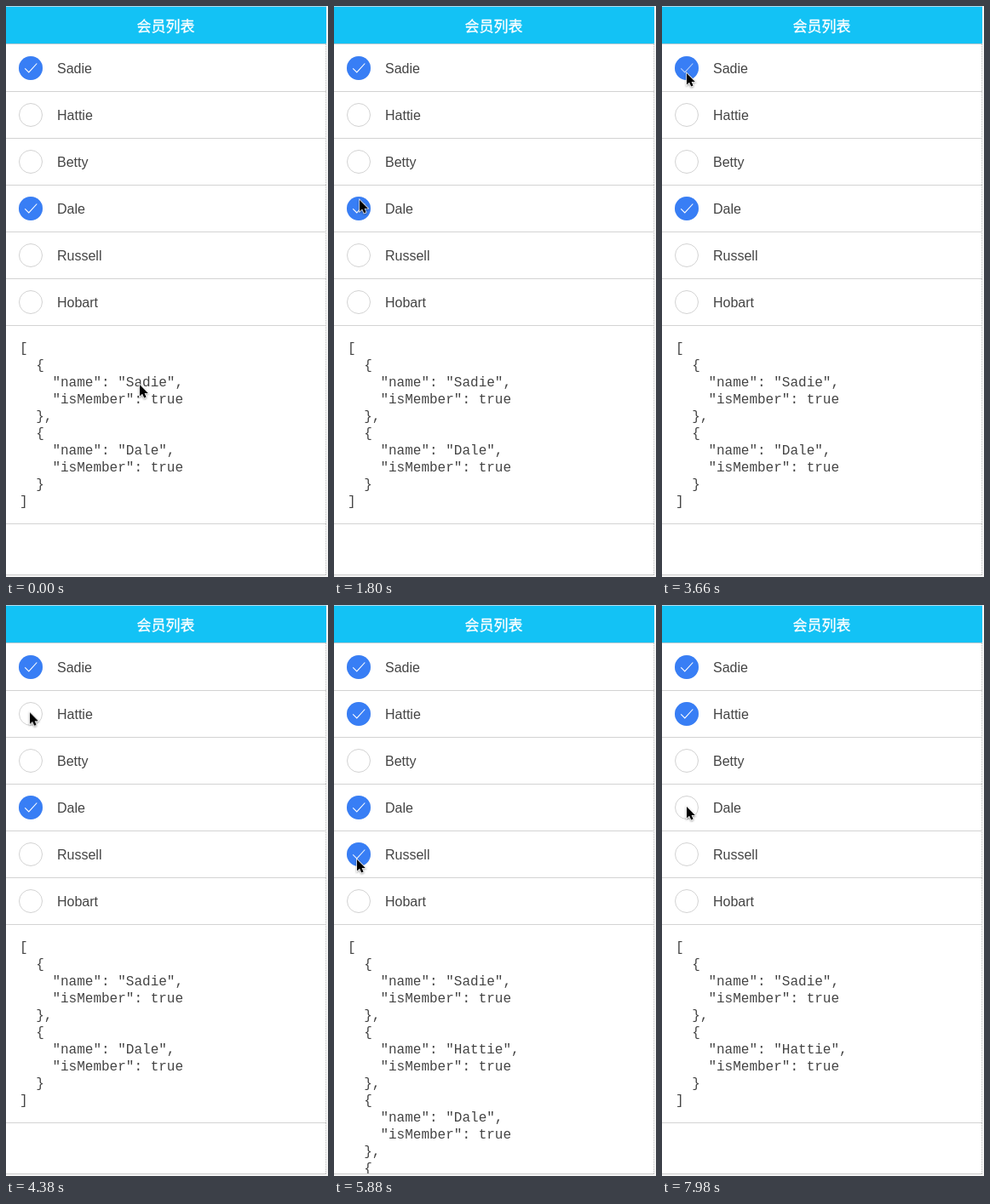
An HTML page for the animation above (8000 ms loop, 378x671 px).

```html
<!DOCTYPE html>
<html lang="zh">
<head>
<meta charset="utf-8">
<title>会员列表</title>
<style>
*, ::before, ::after { box-sizing: border-box; }
html, body { margin: 0; width: 100%; height: 100%; overflow: hidden; background: #f5f5f5; }
.stage { position: relative; width: 378px; height: 671px; overflow: hidden; background: #f5f5f5; }
.page {
  position: absolute; left: 0; top: 0; width: 376px; height: 669px; overflow: hidden;
  background: #fff; border-bottom: 1px solid #ccc;
  color: #444; font: 16px "Liberation Sans", Arial, sans-serif;
}
.page::after { content: ""; position: absolute; right: 0; top: 45px; bottom: 0; border-right: 1px dotted #bbb; }
header {
  height: 45px; padding-right: 1px; background: #13c2f5;
  border-top: 1px solid #b5dcea; border-bottom: 1px solid #b2c8d0;
  color: #fff; font: 500 17px/43px "Noto Sans CJK SC", "Noto Sans CJK", sans-serif; text-align: center;
  -webkit-text-stroke: .3px #fff;
}
.row { position: relative; height: 55px; padding-left: 60px; border-bottom: 1px solid #d3d3d3; line-height: 56px; }
.row:first-of-type { height: 56px; padding-top: 1px; }
.row::before, .dot { content: ""; position: absolute; left: 15px; bottom: 13px; width: 28px; height: 28px; border-radius: 50%; }
.row::before { border: 1px solid #d2d2d2; }
.dot { background: #387ef5; }
.dot svg { display: block; fill: none; stroke: #fff; stroke-width: 1.1; }
.json {
  padding: 17px 0 15px 16px; border-bottom: 1px solid #d3d3d3;
  font: 16px/20px "Liberation Mono", "Courier New", monospace; white-space: pre;
}
.item { height: 80px; overflow: hidden; }
.cursor { position: absolute; left: 0; top: 0; overflow: visible; filter: drop-shadow(0 1px 1px #0006); animation: move 8s ease-in-out infinite; }

/* each member's state drives both its check and its JSON block */
.a { animation: a 8s step-end infinite; }
.b { animation: b 8s step-end infinite; }
.c { animation: c 8s step-end infinite; }
.d { animation: d 8s step-end infinite; }
@keyframes a { 0%, 45%, 100% { opacity: 1; max-height: 80px; } 32.25% { opacity: 0; max-height: 0; } }
@keyframes b { 0% { opacity: 0; max-height: 0; } 57%, 100% { opacity: 1; max-height: 80px; } }
@keyframes c { 0% { opacity: 1; max-height: 80px; } 99%, 100% { opacity: 0; max-height: 0; } }
@keyframes d { 0%, 88.5%, 100% { opacity: 0; max-height: 0; } 72% { opacity: 1; max-height: 80px; } }

.a svg { animation: fade 8s -4.4s linear infinite; }
.b svg { animation: fade 8s -3.44s linear infinite; }
.d svg { animation: fade 8s -2.24s linear infinite; }
@keyframes fade { 0% { opacity: .35; } 1.8%, 100% { opacity: 1; } }

@keyframes move {
  0%, .75% { transform: translate(157px, 445px); }
  12.5%, 14.25% { transform: translate(30px, 64px); }
  20%, 21.75% { transform: translate(30px, 231px); }
  29.25%, 33% { transform: translate(33px, 76px); }
  42%, 47% { transform: translate(29px, 79px); }
  55.5%, 58% { transform: translate(28px, 127px); }
  62.25% { transform: translate(29px, 169px); }
  71%, 74.25% { transform: translate(27px, 299px); }
  79% { transform: translate(30px, 290px); }
  84%, 88.5% { transform: translate(28px, 297px); }
  96.75%, 100% { transform: translate(29px, 237px); }
}
</style>
</head>
<body>
<svg width="0" height="0" style="position:absolute">
  <symbol id="check" viewBox="0 0 28 28"><path d="M7.2 14.3 11.8 18.9 21.3 8.5"/></symbol>
</svg>
<div class="stage">
  <div class="page">
    <header>会员列表</header>
    <div class="row"><i class="dot a"><svg width="28" height="28"><use href="#check"/></svg></i>Sadie</div>
    <div class="row"><i class="dot b"><svg width="28" height="28"><use href="#check"/></svg></i>Hattie</div>
    <div class="row">Betty</div>
    <div class="row"><i class="dot c"><svg width="28" height="28"><use href="#check"/></svg></i>Dale</div>
    <div class="row"><i class="dot d"><svg width="28" height="28"><use href="#check"/></svg></i>Russell</div>
    <div class="row">Hobart</div>
    <div class="json"><div>[</div><div class="item a">  {
    "name": "Sadie",
    "isMember": true
  },</div><div class="item b">  {
    "name": "Hattie",
    "isMember": true
  }<span class="c">,</span></div><div class="item c">  {
    "name": "Dale",
    "isMember": true
  }<span class="d">,</span></div><div class="item d">  {
    "name": "Russell",
    "isMember": true
  }</div><div>]</div></div>
  </div>
  <svg class="cursor" width="12" height="18">
    <path d="M0 0V13.6L3.1 10.8 5.2 15.6 7.6 14.6 5.6 9.9H9.8Z" stroke="#fff" stroke-width="1.4" paint-order="stroke"/>
  </svg>
</div>
</body>
</html>
```
